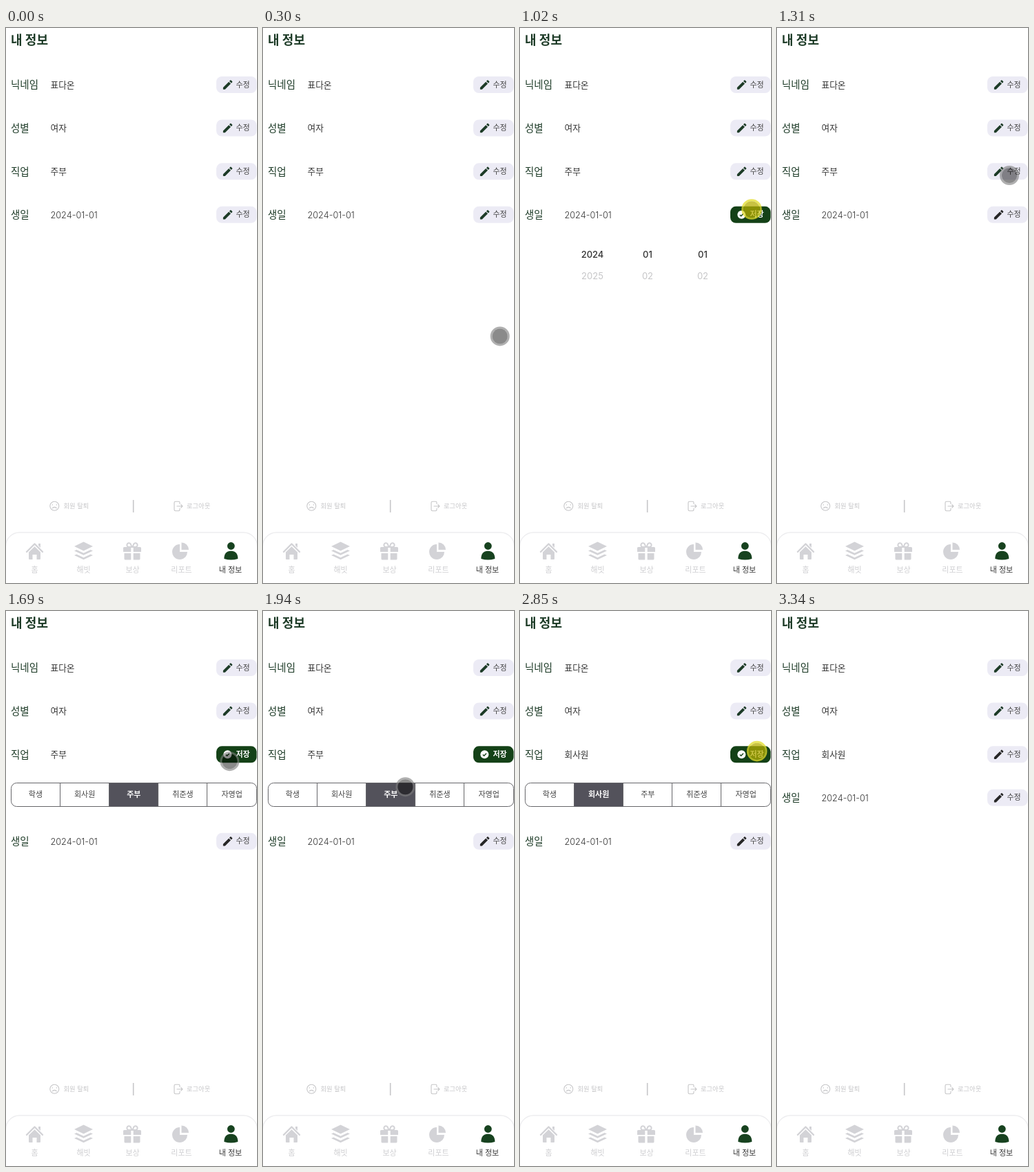
Recreate the animation shown at these times as an HTML page. Size 364 by 802 pixels, loop 3.52 s.

```html
<!DOCTYPE html>
<html lang="ko">
<head>
<meta charset="utf-8">
<title>내 정보</title>
<style>
  html, body { margin: 0; width: 100%; height: 100%; overflow: hidden; background: #fff; }
  svg { display: block; font-family: Inter, 'Noto Sans CJK KR', 'Noto Sans CJK', sans-serif; }
</style>
</head>
<body>
<svg id="stage" width="364" height="802" viewBox="0 0 364 802"></svg>
<script>
const LOOP = 3520, GREEN = '#1d3b27', GRAY = '#d3d3d7', PALE = '#c6c6c8';
const stage = document.getElementById('stage');
const $ = id => document.getElementById(id);

// Text placed by the vertical centre of its glyphs.
const text = (s, x, cy, size, fill, weight = 400, anchor = 'start', id = '') =>
  `<text id="${id}" x="${x}" y="${cy + size * 0.375}" font-size="${size}" fill="${fill}"
    font-weight="${weight}" text-anchor="${anchor}">${s}</text>`;

const PEN = 'M3 17.25V21h3.75L17.81 9.94l-3.75-3.75zM20.71 7.04c.39-.39.39-1.02 0-1.41l-2.34-2.34a1 1 0 0 0-1.41 0l-1.83 1.83 3.75 3.75z';

const row = (key, label, value, cy) => `<g id="${key}">
  ${text(label, 7, cy, 14.5, GREEN, 500)}
  ${text(value, 64.5, cy, 12.7, '#333', 300, 'start', key + 'Value')}
  <g id="${key}Edit">
    <rect x="305" y="${cy - 12}" width="58.5" height="24" rx="8" fill="#ecebf5"/>
    <path id="${key}Pen" d="${PEN}" fill="${GREEN}" transform="translate(312.6 ${cy - 9}) scale(.75)"/>
    ${text('수정', 333.5, cy - .5, 11, '#444')}
  </g>
  <g id="${key}Save">
    <rect x="305" y="${cy - 12}" width="58.5" height="24" rx="8" fill="#144117"/>
    <circle cx="321.3" cy="${cy}" r="6" fill="#fff"/>
    <path d="M318.8 ${cy + .2}l1.8 1.8 3.3-3.6" fill="none" stroke="#144117" stroke-width="1.4"/>
    ${text('저장', 333.5, cy - .5, 11, '#fff', 700)}
  </g></g>`;

const jobs = ['학생', '회사원', '주부', '취준생', '자영업'];
const cellX = i => 7.5 + 71.2 * i;
const jobPanel = `<g id="jobPanel">
  <rect id="chosen" y="248.5" width="71.2" height="34" fill="#53525b"/>
  <rect x="7.5" y="248.5" width="356" height="34" rx="8" fill="none" stroke="#66666a"/>
  ${jobs.slice(1).map((_, i) => `<path d="M${Math.round(cellX(i + 1)) - .5} 248.5v34" stroke="#66666a"/>`).join('')}
  ${jobs.map((s, i) => text(s, cellX(i) + 35.4, 265, 11, '#444', 400, 'middle', 'job' + i)).join('')}
</g>`;

const datePanel = `<g id="datePanel">
  ${[['2024', '2025', 105], ['01', '02', 185], ['01', '02', 265]].map(([now, next, x]) =>
    text(now, x, 327, 13, '#333', 500, 'middle') + text(next, x, 358, 13, PALE, 400, 'middle')).join('')}
</g>`;

const footer = `<g fill="none" stroke="${PALE}" stroke-width="1.1">
  <circle cx="70.3" cy="690.8" r="6.5"/>
  <path d="M67 694.2q3.3-3.6 6.6 0M67.3 688.2v1.6M73.3 688.2v1.6"/>
  <path d="M252 688v-2q0-1.700-1.700-1.700h-4.600q-1.700 0-1.700 1.700v10q0 1.700 1.700 1.700h4.600q1.700 0 1.700-1.700v-2M247.500 691h8.500m-2.500-2.500 2.500 2.500-2.500 2.500"/>
  <path d="M184.7 682v18" stroke-width="1.6"/></g>
  ${text('회원 탈퇴', 83.5, 690.8, 9.3, PALE)}${text('로그아웃', 262, 690.8, 9.3, PALE)}`;

const tabs = `<rect x="-.5" y="729" width="365" height="100" rx="20" fill="#fff" stroke="#ededef" stroke-width="1.3"/>
  <g fill="${GRAY}">
    <path d="M30 757 41.500 745.500 53 757" fill="none" stroke="${GRAY}" stroke-width="2.400" stroke-linecap="round" stroke-linejoin="round"/>
    <path d="M33 757.500 41.500 749.200 50 757.500V767q0 1-1 1h-4.500v-7h-6v7H34q-1 0-1-1zM47 745h3v6l-3-3z"/>
    <path d="M112.500 742.500 126 749l-13.500 6.500L99 749z"/>
    <path id="layer" d="M99 755.400l3.300-1.500 10.200 4.800 10.200-4.800 3.300 1.500-13.500 6.400z"/>
    <use href="#layer" y="6.500"/>
    <path d="M171.500 750h9.800v7h-11.300v-5.500q0-1.500 1.500-1.500zM184.700 750h9.800q1.500 0 1.500 1.500v5.500h-11.300zM171.500 759h9.800v9.500h-8.300q-1.500 0-1.500-1.500zM184.700 759h9.800v8q0 1.500-1.500 1.500h-8.300z"/>
    <path d="M182.500 750h-4.500a2.900 2.900 0 1 1 2.600-4.600zM183.500 750h4.500a2.900 2.900 0 1 0-2.600-4.600z" fill="none" stroke="${GRAY}" stroke-width="2"/>
    <path d="M252 746v11h11a11 11 0 1 1-11-11zM254.500 743.500a10.500 10.500 0 0 1 10.500 10.500h-10.500z"/>
  </g>
  <g fill="#17421f"><circle cx="326.300" cy="748.500" r="5.400"/>
    <path d="M316.300 767c0-8 4-11.200 10-11.200s10 3.200 10 11.200q-10 3-20 0z"/></g>
  ${['홈', '해빗', '보상', '리포트', '내 정보'].map((s, i) =>
    text(s, 41.5 + 71 * i, 783, 11, i == 4 ? '#333' : '#cfcfd2', i == 4 ? 500 : 400, 'middle')).join('')}`;

stage.innerHTML = text('내 정보', 7, 17, 18, GREEN, 700)
  + row('nick', '닉네임', '표다온', 82) + row('sex', '성별', '여자', 144.5)
  + row('work', '직업', '주부', 207.3) + row('birth', '생일', '2024-01-01', 269.8)
  + jobPanel + datePanel + footer + tabs
  + `<g id="cursor"><circle r="12.8" fill="none" stroke-width="3"/><circle r="11.3"/></g>`;

// Pointer path: time, x, y
const path = [
  [110, 350, 784], [250, 346, 520], [380, 340, 330], [480, 337, 245], [550, 336, 262],
  [1100, 336, 262], [1220, 337, 236], [1310, 337, 213], [1660, 337, 213],
  [1800, 280, 232], [1940, 207, 254], [1970, 190, 258], [2030, 180, 260], [2150, 125, 269],
  [2360, 125, 269], [2450, 215, 255], [2480, 257, 247], [2540, 338, 215], [2660, 343, 202],
  [2950, 344, 203], [3280, 344, 203], [3310, 349, 208], [3340, 349, 208]
];
const presses = [[720, 820], [1000, 1090], [1470, 1560], [2230, 2320], [2820, 2920]];
const within = (t, [a, b]) => t >= a && t < b;
const show = (id, on) => $(id).setAttribute('display', on ? 'inline' : 'none');

function setEditing(key, on, touched) {
  show(key + 'Edit', !on);
  show(key + 'Save', on);
  if (key) $(key + 'Pen').setAttribute('fill', touched ? '#262626' : GREEN);
}

function drawCursor(t) {
  const next = path.findIndex(p => p[0] > t);
  show('cursor', next > 0);
  if (next < 1) return;
  const [t0, x0, y0] = path[next - 1], [t1, x1, y1] = path[next];
  const k = (t - t0) / (t1 - t0);
  $('cursor').setAttribute('transform', `translate(${x0 + (x1 - x0) * k} ${y0 + (y1 - y0) * k})`);
  const pressed = presses.some(p => within(t, p));
  const [ring, disc] = $('cursor').children;
  ring.setAttribute('r', pressed ? 13.3 : 12.5);
  ring.setAttribute('stroke', pressed ? 'rgba(225,220,40,.75)' : 'rgba(123,123,123,.6)');
  disc.setAttribute('r', pressed ? 11.8 : 11);
  disc.setAttribute('fill', pressed ? 'rgba(181,173,0,.74)' : 'rgba(0,0,0,.46)');
}

function render(t) {
  const working = within(t, [1560, 2920]), dating = within(t, [820, 1090]);
  const picked = t < 2320 ? 2 : 1;
  setEditing('nick', false);
  setEditing('sex', false);
  setEditing('work', working, t >= 1560);
  setEditing('birth', dating, t >= 820);
  show('jobPanel', working);
  show('datePanel', dating);
  $('birth').setAttribute('transform', `translate(0 ${working ? 63 : 0})`);
  $('workValue').textContent = jobs[picked];
  $('chosen').setAttribute('x', cellX(picked));
  jobs.forEach((_, i) => {
    $('job' + i).setAttribute('fill', i == picked ? '#fff' : '#444');
    $('job' + i).setAttribute('font-weight', i == picked ? 700 : 400);
  });
  drawCursor(t);
}

const start = performance.now();
function tick() {
  render((performance.now() - start) % LOOP);
  requestAnimationFrame(tick);
}
tick();
</script>
</body>
</html>
```
